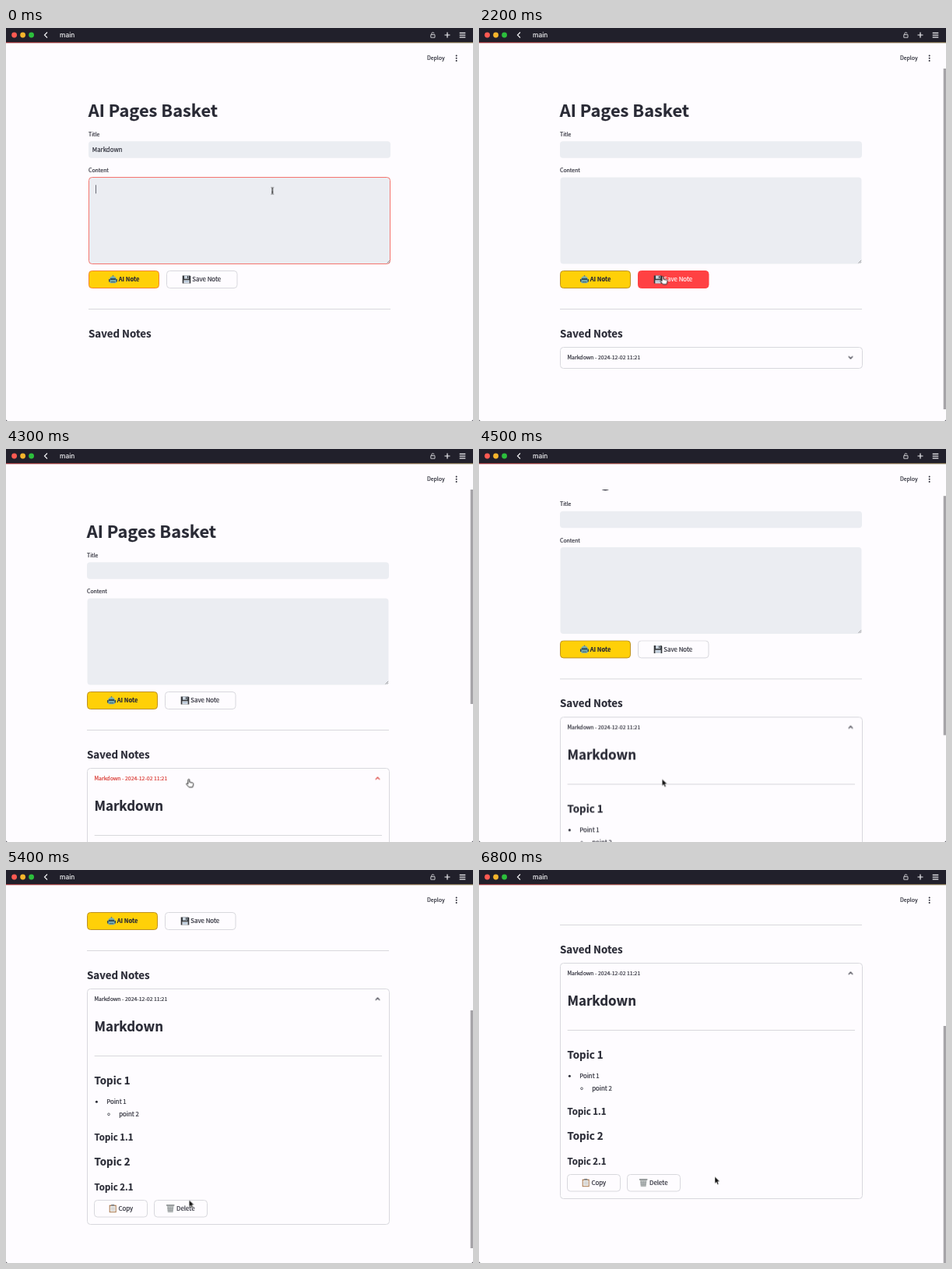
An HTML page for the animation above (6900 ms loop, 600 by 504 pixels).

```html
<!DOCTYPE html>
<html lang="en">
<head>
<meta charset="utf-8">
<title>Notes app</title>
<style>
html, body { margin: 0; width: 100%; height: 100%; overflow: hidden; background: #2b2a33; }
svg { display: block; width: 600px; height: 504px; color: #292a35; }
text {
  font: 400 7.85px "Noto Sans CJK JP", "Noto Sans CJK SC", "Noto Sans CJK", "Open Sans", sans-serif;
  fill: currentColor;
  stroke: currentColor;
  stroke-width: .18px;
}
.small { font-size: 6.92px; }
.btn { font-size: 7.9px; font-weight: 500; }
.h1 { font-size: 21.8px; font-weight: 700; }
.h2 { font-size: 17px; font-weight: 700; }
.h3 { font-size: 13.3px; font-weight: 700; }
.h4 { font-size: 11.4px; font-weight: 700; }
.hint { font-size: 5.9px; color: #7b7d88; }
.field { fill: #ebedf2; }
.box { fill: #fefcff; stroke: #d8d8dd; }
.rule { stroke: #d8d8dc; }
.line { fill: none; stroke: currentColor; }
#bar text { font: 500 8.4px Inter, Roboto, sans-serif; color: #f4f4f6; stroke: none; }

/* One clock for everything; movement uses steps of 100 ms. */
.a { animation: 6.9s step-end -3ms infinite; }

#page { animation-name: shift; }
@keyframes shift { 0% { transform: none; } 30.43% { transform: translateX(-2px); } }

#scroll { animation-name: scroll; }
@keyframes scroll {
  0% { transform: none; }
  62.32% { transform: none; animation-timing-function: steps(5); }
  69.57% { transform: translateY(-164px); animation-timing-function: steps(6); }
  78.26% { transform: translateY(-257px); }
  86.96% { transform: translateY(-257px); animation-timing-function: steps(4); }
  92.75%, 100% { transform: translateY(-290px); }
}

#thumb { animation-name: thumb; }
@keyframes thumb {
  0% { opacity: 0; height: 470px; transform: none; }
  30.43% { opacity: 1; height: 470px; transform: none; }
  53.62% { opacity: 1; height: 470px; transform: none; animation-timing-function: steps(3); }
  57.97% { opacity: 1; height: 308px; transform: none; }
  62.32% { opacity: 1; height: 308px; transform: none; animation-timing-function: steps(5); }
  69.57% { opacity: 1; height: 305px; transform: translateY(103px); animation-timing-function: steps(6); }
  78.26% { opacity: 1; height: 305px; transform: translateY(161px); }
  86.96% { opacity: 1; height: 305px; transform: translateY(161px); animation-timing-function: steps(4); }
  92.75%, 100% { opacity: 1; height: 305px; transform: translateY(181px); }
}

#caret { animation-name: caret; }
@keyframes caret {
  0% { opacity: 1; transform: none; }
  4.35% { opacity: 1; transform: translate(52px, 90px); }
  27.54% { opacity: 0; }
}
#pasted { animation-name: pasted; }
@keyframes pasted { 0% { opacity: 0; } 4.35% { opacity: 1; } 30.43% { opacity: 0; } }
#value { animation-name: value; }
@keyframes value { 0% { opacity: 1; } 30.43% { opacity: 0; } }
#area { animation-name: area; }
@keyframes area { 0% { stroke: #f4756f; } 27.54% { stroke: none; } }
#ai { animation-name: ai; }
@keyframes ai { 0% { stroke: #f5832e; } 30.43% { stroke: #bd9022; } 81.16% { stroke: #dc8a2c; } 86.96% { stroke: #bd9022; } }

#save { animation-name: save; }
@keyframes save {
  0% { fill: #fefcff; stroke: #d8d8dd; }
  21.74% { fill: #fefcff; stroke: #ff4b4b; }
  27.54% { fill: #ff4143; stroke: #ff4143; }
  33.33% { fill: #fefcff; stroke: #ff4b4b; }
  36.23% { fill: #fefcff; stroke: #d8d8dd; }
}
#saveText { animation-name: saveText; }
@keyframes saveText {
  0% { color: #292a35; } 21.74% { color: #ff4b4b; } 27.54% { color: #fff; }
  33.33% { color: #ff4b4b; } 36.23% { color: #292a35; }
}
#del { animation-name: del; }
@keyframes del {
  0% { fill: #fefcff; stroke: #d8d8dd; }
  81.16% { fill: #fefcff; stroke: #ff4b4b; }
  82.61% { fill: #ff4143; stroke: #ff4143; }
  86.96% { fill: #fefcff; stroke: #d8d8dd; }
}
#delText { animation-name: delText; }
@keyframes delText { 0% { color: #292a35; } 81.16% { color: #ff4b4b; } 82.61% { color: #fff; } 86.96% { color: #292a35; } }

#note { animation-name: note; }
@keyframes note { 0% { opacity: 0; } 30.43% { opacity: 1; } }
.grow { animation-name: grow; }
@keyframes grow {
  0% { height: 27px; }
  53.62% { height: 27px; animation-timing-function: steps(3); }
  57.97%, 100% { height: 302px; }
}
#head { animation-name: head; }
@keyframes head { 0% { color: #292a35; } 47.83% { color: #d9342d; } 65.22% { color: #292a35; } }
#chev { animation-name: chev; }
@keyframes chev { 0% { transform: translate(479.5px, 422.5px); } 53.62% { transform: translate(479.5px, 422.5px) scaleY(-1); } }

#mouse { animation-name: mouse; }
@keyframes mouse {
  0% { transform: translate(342.3px, 208.8px); }
  10.14% { transform: translate(342.3px, 208.8px); animation-timing-function: steps(4); }
  15.94% { transform: translate(305.7px, 257px); animation-timing-function: steps(3); }
  20.29% { transform: translate(270px, 305px); animation-timing-function: steps(4); }
  26.09% { transform: translate(237.5px, 323.5px); }
  34.78% { transform: translate(237.5px, 323.5px); animation-timing-function: steps(10); }
  49.28% { transform: translate(236.3px, 428.5px); }
  79.71% { transform: translate(236.3px, 428.5px); animation-timing-function: steps(2); }
  82.61% { transform: translate(238.5px, 429.5px); }
  94.2% { transform: translate(238.5px, 429.5px); animation-timing-function: steps(3); }
  98.55%, 100% { transform: translate(304px, 398.5px); }
}
#beam { animation-name: beam; }
@keyframes beam { 0% { opacity: 1; } 20.29% { opacity: 0; } }
#hand { animation-name: hand; }
@keyframes hand {
  0% { opacity: 0; } 21.74% { opacity: 1; } 36.23% { opacity: 0; } 47.83% { opacity: 1; }
  65.22% { opacity: 0; } 81.16% { opacity: 1; } 86.96% { opacity: 0; }
}
#arrow { animation-name: arrow; }
@keyframes arrow {
  0% { opacity: 0; } 20.29% { opacity: 1; } 21.74% { opacity: 0; } 36.23% { opacity: 1; } 47.83% { opacity: 0; }
  65.22% { opacity: 1; } 81.16% { opacity: 0; } 86.96% { opacity: 1; }
}
</style>
</head>
<body>
<svg viewBox="0 0 600 504" xmlns="http://www.w3.org/2000/svg">
  <defs>
    <clipPath id="areaClip"><rect x="106" y="192" width="388" height="110"/></clipPath>
    <clipPath id="noteClip"><rect class="a grow" x="106" y="409.5" width="388" height="27"/></clipPath>
    <linearGradient id="accent"><stop stop-color="#98363b"/><stop offset="1" stop-color="#7d7050"/></linearGradient>
  </defs>

  <path d="M0 18H600V501.500q0 2.500-2.500 2.500H2.500q-2.500 0-2.500-2.500z" fill="#fefcff"/>

  <g id="page" class="a"><g id="scroll" class="a">
    <text class="h1" x="105.700" y="114">AI Pages Basket</text>

    <text class="small" x="106" y="138.700">Title</text>
    <rect class="field" x="106" y="145.300" width="388" height="21.500" rx="4"/>
    <text id="value" class="a" x="110.800" y="159.200">Markdown</text>

    <text class="small" x="106" y="185.200">Content</text>
    <rect id="area" class="a field" x="106.500" y="191.500" width="387" height="111" rx="4"/>
    <path class="line" color="#777" stroke-width=".7" d="M489.500 301.500l3.700-3.700M491.600 301.500l1.600-1.600"/>
    <g id="pasted" class="a" clip-path="url(#areaClip)">
      <text x="115" y="188.700"># Markdown</text>
      <text x="115" y="201">---</text>
      <text x="115" y="213.400">### Topic 1</text>
      <text x="115" y="225.700">- Point 1</text>
      <text x="118.600" y="238.100">- point 2</text>
      <text x="115" y="262.800">#### Topic 1.1</text>
      <text x="115" y="287.500">### Topic 2</text>
      <text x="115" y="299.800">#### Topic 2.1</text>
      <text class="hint" x="490.500" y="300.200" text-anchor="end">Press ⌘+Enter to apply</text>
      <rect x="490.500" y="208" width="3.200" height="84" rx="1.500" fill="#8d8d92"/>
    </g>
    <rect id="caret" class="a" x="115.200" y="201.300" width=".7" height="11" fill="#31333f"/>

    <rect id="ai" class="a" x="106.500" y="311.500" width="90" height="22" rx="4" fill="#ffd008"/>
    <g transform="translate(137.500 322.500)">
      <path d="M-4.500 0a4.500 4.300 0 0 1 9 0v3q0 1.800-1.800 1.800h-5.400q-1.800 0-1.800-1.800z" fill="#78aeb4"/>
      <path d="M-5.500-.5h1.500v3.500h-1.500zM4-.5h1.500v3.500h-1.500z" fill="#35474e"/>
      <path d="M-3.600-1.600h7.200v2.200h-7.200z" fill="#35505a"/>
      <path d="M-2.800 2.600h5.600v1.200h-5.600z" fill="#466a72"/>
      <circle cy="-4.700" r=".8" fill="#566f78"/>
    </g>
    <text class="btn" x="144.700" y="325.300" style="font-size:7.6px;font-weight:700">AI Note</text>

    <rect id="save" class="a box" x="206.500" y="311.500" width="90.500" height="22" rx="4"/>
    <g transform="translate(232 322.500)">
      <path d="M-5.300-5H4.300L5.300-4V5H-5.300z" fill="#35383d"/>
      <path d="M-3-5H3v4.200H-3z" fill="#c9d3dc"/><path d="M1-4.400h1.200v2.800H1z" fill="#35383d"/>
      <path d="M-3.600 .8h7.200V5h-7.200z" fill="#eceef0"/><path d="M-2.800 2h5.600M-2.800 3.500h5.600" stroke="#7b9cc0" stroke-width=".6"/>
    </g>
    <text id="saveText" class="a btn" x="239.300" y="325.300">Save Note</text>

    <path class="rule" d="M106 360.500H494"/>
    <text class="h3" x="106" y="397">Saved Notes</text>

    <g id="note" class="a">
      <rect class="a grow box" x="106.500" y="409.500" width="388" height="27" rx="4"/>
      <g id="head" class="a">
        <text class="small" x="115.500" y="425.400">Markdown - 2024-12-02 11:21</text>
        <path id="chev" class="a line" stroke-width="1.200" d="M-2.600-1.300L0 1.300 2.600-1.300"/>
      </g>
      <g clip-path="url(#noteClip)">
        <text class="h2" x="115.400" y="463.800">Markdown</text>
        <path class="rule" d="M115.700 495.500H485"/>
        <text class="h3" x="115.600" y="532.300">Topic 1</text>
        <circle cx="118.400" cy="554.300" r="1.500" fill="#292a35"/>
        <text x="131.200" y="557">Point 1</text>
        <circle cx="134" cy="570.300" r="1.400" fill="none" stroke="#292a35" stroke-width=".7"/>
        <text x="147.200" y="573.200">point 2</text>
        <text class="h4" x="115.600" y="604.300">Topic 1.1</text>
        <text class="h3" x="115.600" y="636">Topic 2</text>
        <text class="h4" x="115.600" y="667.800">Topic 2.1</text>

        <rect class="box" x="115.500" y="680.500" width="68" height="21.500" rx="4"/>
        <g transform="translate(139.200 691.200)">
          <path d="M-4.500-4.500h9V5h-9z" fill="#a9774c"/><path d="M-3.500-3.300h7V4h-7z" fill="#f3f2ef"/>
          <path d="M-2-5.300h4v2h-4z" fill="#85888c"/>
          <path d="M-2.600-1.500h5.200M-2.600.3h5.200M-2.600 2.100h5.200" stroke="#a5a5a8" stroke-width=".6"/>
        </g>
        <text class="btn" x="146.400" y="694">Copy</text>

        <rect id="del" class="a box" x="192.500" y="680.500" width="68" height="21.500" rx="4"/>
        <g transform="translate(213.200 691.200)">
          <path d="M-4.500-4h9L3.400 5h-6.800z" fill="#bcc0c0"/>
          <path d="M-2.600-2.500l.7 6.800M0-2.500v6.800M2.600-2.500l-.7 6.800M-4 0h8M-3.600 2.400h7.200" stroke="#868d8e" stroke-width=".5"/>
          <path d="M-5.200-5H5.200v1.400H-5.200z" fill="#7c8283"/>
        </g>
        <text id="delText" class="a btn" x="221" y="694">Delete</text>
      </g>
    </g>
  </g></g>

  <rect id="thumb" class="a" x="596.700" y="19" width="3.300" height="470" fill="#a6a4a8"/>

  <rect y="18" width="600" height="34" fill="#fefcff"/>
  <text class="small" x="541" y="41.300" style="font-weight:500">Deploy</text>
  <g fill="#292a35"><circle cx="578.700" cy="35.600" r="1"/><circle cx="578.700" cy="38.800" r="1"/><circle cx="578.700" cy="42" r="1"/></g>

  <g id="bar">
    <rect width="600" height="18.100" fill="#21202b"/>
    <rect y="18" width="600" height="1.300" fill="url(#accent)"/>
    <circle cx="10.600" cy="9" r="3.400" fill="#ff5a52"/>
    <circle cx="21.600" cy="9" r="3.400" fill="#f6b52c"/>
    <circle cx="32.600" cy="9" r="3.400" fill="#2cbf3c"/>
    <text x="69" y="12.200">main</text>
    <g class="line" color="#f0f0f3">
      <path stroke-width="1.200" d="M53 5.500L49.500 9l3.500 3.500"/>
      <path stroke-width=".8" d="M545.800 8.600h5.200v3.600h-5.200zM546.900 8.600V7.200a1.500 1.500 0 0 1 3 0"/>
      <path stroke-width="1.200" d="M563.500 9h7M567 5.500v7M582.700 6.300h7.600M582.700 9.100h7.600M582.700 11.900h7.600"/>
    </g>
  </g>

  <g id="mouse" class="a">
    <path id="beam" class="a line" color="#222" stroke-width=".8" d="M-1.600-4.300Q0-4.300 0-3.200V3.200Q0 4.300-1.600 4.300M1.600-4.300Q0-4.300 0-3.200V3.200Q0 4.300 1.600 4.300M-1 1.500h2"/>
    <path id="hand" class="a" fill="#fff" stroke="#111" stroke-width=".9" d="M-1.600-5c.8 0 1.200.5 1.200 1.200v2.600l3.600.7c1 .2 1.400.8 1.300 1.700l-.5 2.700-.6 1.300h-4.600l-3.300-3.600c-.5-.7.3-1.600 1.200-1.100l.9.600v-4.900c0-.7.3-1.200.8-1.200z"/>
    <path id="arrow" class="a" fill="#111" stroke="#fff" stroke-width=".5" d="M-1-5.200v8.800l2-1.900 1.400 3.200 1.600-.7-1.400-3.100h2.800z"/>
  </g>
</svg>
</body>
</html>
```
